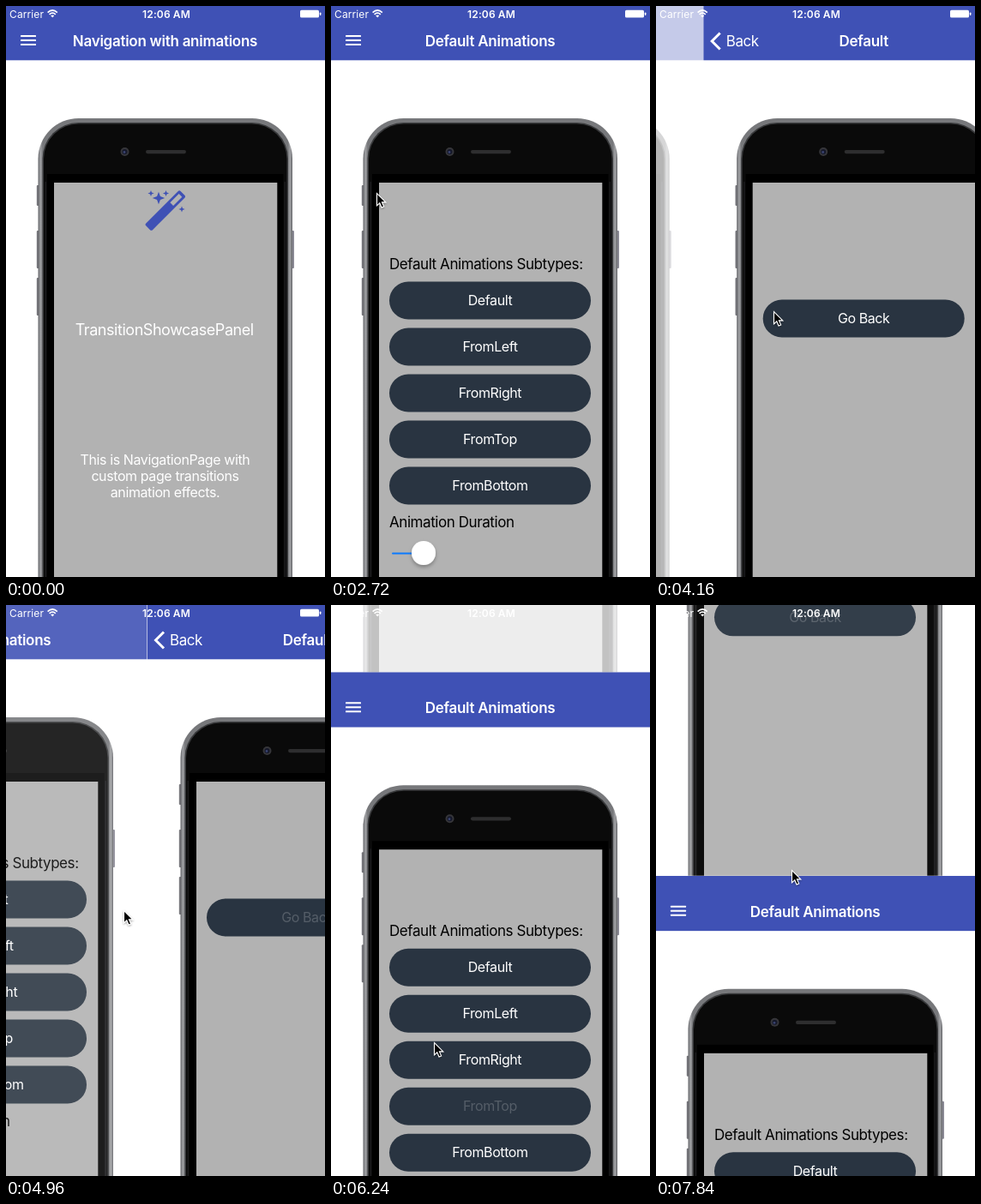
Recreate the animation shown at these times as an HTML page. Size 372x666 px, loop 8000 ms.

```html
<!DOCTYPE html>
<html lang="en">
<head>
<meta charset="utf-8">
<title>Page transitions</title>
<style>
html, body { margin: 0; width: 100%; height: 100%; overflow: hidden; background: #fff; }
svg { display: block; width: 100%; height: 100%; }
text { font-family: Inter, Roboto, sans-serif; letter-spacing: -.025em; fill: #fff; white-space: pre; }
.mid { text-anchor: middle; }
.bold { font-weight: 600; letter-spacing: -.016em; }
.dark { fill: #000; }
.status { letter-spacing: .01em; }
.dim { opacity: .2; }
</style>
</head>
<body>
<svg id="stage" viewBox="0 0 372 666" preserveAspectRatio="none"></svg>
<script>
const W = 375, H = 667, LOOP = 8000, STEP = 160, PUSH = 600, DRAWER = 300;
const INK = '#293441', BLUE = '#3f51b5';

// ---------- markup helpers ----------
const rect = (x, y, w, h, fill, rx = 0) =>
  `<rect x="${x}" y="${y}" width="${w}" height="${h}" rx="${rx}" fill="${fill}"/>`;
const text = (x, y, size, str, cls = '', id = '') =>
  `<text x="${x}" y="${y}" font-size="${size}" class="${cls}" id="${id}">${str}</text>`;
const bars = (x, ys, w, h) => ys.map(y => rect(x, y, w, h, '#fff', .5)).join('');
const button = (y, label, id) =>
  rect(68, y, 235, 44, INK, 22) + text(185.5, y + 27.5, 16, label, 'mid', id);
const star = (x, y, r) =>
  `<path transform="translate(${x} ${y}) scale(${r})" fill="${BLUE}"
    d="M0-1L.27-.27 1 0 .27.27 0 1-.27.27-1 0-.27-.27Z"/>`;

const defs = `<defs>
<clipPath id="screen">${rect(-1.5, -1, W, H, '#000')}</clipPath>
<linearGradient id="rim">
  <stop offset="0" stop-color="#626367"/><stop offset=".009" stop-color="#a1a2a5"/>
  <stop offset=".018" stop-color="#77787b"/><stop offset=".982" stop-color="#77787b"/>
  <stop offset=".991" stop-color="#a1a2a5"/><stop offset="1" stop-color="#626367"/>
</linearGradient>
<filter id="soft" x="-50%" y="-50%" width="200%" height="200%">
  <feDropShadow dx="0" dy="2.5" stdDeviation="2" flood-opacity=".3"/>
</filter>
<filter id="shade" x="-50%" y="-50%" width="200%" height="200%">
  <feDropShadow dx="0" dy="1" stdDeviation="1" flood-opacity=".4"/>
</filter>
<g id="phone">
  ${[[209, 24], [262, 44], [317, 44]].map(([y, h]) => rect(35.8, y, 3, h, '#77777c', 1)).join('')}
  ${rect(333, 262, 3, 44, '#8a8994', 1)}
  ${rect(37.5, 131, 296.5, 640, 'url(#rim)', 47)}
  ${rect(42.5, 136, 286.5, 640, '#38393b', 42)}
  ${rect(44, 137.5, 283.5, 640, '#0a0a0a', 41)}
  ${rect(48, 196, 275.5, 480, '#000')}
  ${rect(45.5, 205, 1.5, 480, '#1b1b1d')}
  ${rect(324.5, 205, 1.5, 480, '#1b1b1d')}
  ${rect(56, 206, 260.3, 480, '#b2b2b2')}
  ${rect(163, 168, 47, 4.2, '#2e2e2f', 2.1)}
  <circle cx="138.5" cy="170" r="5" fill="#36363a"/>
  <circle cx="138.5" cy="170" r="3" fill="#15182a"/>
  <circle cx="138" cy="170.5" r="1.4" fill="#3a4370"/>
</g></defs>`;

const page = (id, title, nav, body) => `<g id="${id}" clip-path="url(#screen)">
  ${rect(-1.5, -1, W, H, '#fff')}<use href="#phone"/>
  ${rect(-1.5, -1, W, 64.3, BLUE)}
  ${text(185.5, 47, 17, title, 'mid bold', id + 'Title')}${nav}${body}</g>`;
const burger = id => `<g id="${id}">${bars(17, [34, 39, 44], 18, 2)}</g>`;

const wand = `<g transform="translate(185.8 238.6) rotate(-45)">
  ${rect(-28.5, -5.4, 57, 10.8, BLUE, 2)}${rect(10.5, -2.6, 14.5, 5.2, '#b2b2b2')}</g>
  ${star(178, 224, 7.2)}${star(169, 218.5, 3.6)}${star(186.5, 218.5, 3.6)}${star(205, 237, 3.6)}`;

const home = page('home', 'Navigation with animations', burger('homeBurger'), wand +
  text(184.7, 384, 18, 'TransitionShowcasePanel', 'mid') +
  ['This is NavigationPage with', 'custom page transitions', 'animation effects.']
    .map((s, i) => text(185.5, 535 + i * 19, 16, s, 'mid')).join(''));

const menu = page('menu', 'Default Animations', burger('menuBurger'),
  text(68, 307, 17, 'Default Animations Subtypes:', 'dark') +
  ['Default', 'FromLeft', 'FromRight', 'FromTop', 'FromBottom']
    .map((s, i) => button(321.5 + i * 54, s, 'btn' + s)).join('') +
  text(68, 607.5, 17, 'Animation Duration', 'dark') +
  rect(71, 637.5, 30, 2, '#0a7aff', 1) +
  '<circle cx="108" cy="638" r="14" fill="#fff" filter="url(#soft)"/>');

const child = page('child', 'Default',
  '<path d="M18 31.5L8.5 41 18 50.5" fill="none" stroke="#fff" stroke-width="3"/>' +
  text(25, 47, 17, 'Back'), button(342.5, 'Go Back', 'goBack'));

// ---------- side drawer ----------
const icons = [
  bars(18, [-7, -1.5, 4], 17, 3),
  bars(18, [-7, -1.5, 4], 17, 3),
  bars(18, [-7, -1.5, 4], 4, 3.4) + bars(24, [-7, -1.5, 4], 14, 3),
  bars(18, [-8, -4, 0, 4], 3, 3) + bars(22.5, [-8, -4, 0, 4], 15.5, 3),
  '<rect x="18.8" y="-7.2" width="18.4" height="14" rx="1.5" fill="none" stroke="#fff" stroke-width="1.6"/>' +
    bars(18.5, [-7.5], 19, 3.5) + bars(21, [-2.5, .2, 3], 2, 1.5) + bars(24.5, [-2.5, .2, 3], 10.5, 1.5)
];
const drawer = `<g id="drawer">${rect(-2, -1, W, H, INK)}
  <circle cx="45" cy="66" r="27" fill="#f1c40f"/>
  ${text(99, 60, 22, 'Navigation', 'bold')}${text(99, 87, 16, 'With animations')}
  ${text(18, 141.5, 17.25, 'ANIMATION TYPES', 'bold')}${rect(-2, 157, W, 1, '#8b929a')}
  ${['Empty', 'Default', 'Fade', 'Slide', 'Flip'].map((s, i) =>
    `<g transform="translate(0 ${180 + i * 44})">${icons[i]}</g>` +
    text(48, 186 + i * 44, 18, s + ' Animations')).join('')}</g>`;

const status = text(4, 13.5, 12, 'Carrier', 'status') +
  text(187, 13.5, 12, '12:06 AM', 'mid bold status') +
  `<g fill="none" stroke="#fff" stroke-width="1.7">
    <path d="M48.6 7.6Q54.2 2.4 59.8 7.6M50.6 9.9Q54.2 6.5 57.8 9.9"/></g>
  <path d="M52.2 11.3Q54.2 9.6 56.2 11.3L54.2 13.4Z" fill="#fff"/>` +
  rect(343, 4.8, 22, 8.8, '#fff', 1.6) + rect(365.8, 7.4, 1.6, 3.6, '#fff', .8);

const arrow = `<path id="cursor" filter="url(#shade)" fill="#000" stroke="#fff" stroke-width="1.1"
  d="M.5.5V14.8L3.8 11.8 6 17 8.6 15.9 6.4 10.9H10.8Z"/>`;

document.getElementById('stage').innerHTML =
  defs + rect(-2, -1, W, H, '#fff') + drawer + home + menu + child + status + arrow;
const $ = id => document.getElementById(id);

// ---------- motion ----------
// Standard ease-in-out curve: (.42, 0) (.58, 1)
function ease(x) {
  if (x <= 0) return 0;
  if (x >= 1) return 1;
  let s = x;
  for (let i = 0; i < 6; i++)
    s -= (1.26 * s - .78 * s * s + .52 * s ** 3 - x) / (1.26 - 1.56 * s + 1.56 * s * s);
  return s * s * (3 - 2 * s);
}
const ramp = (t, start, length) => ease((t - start) / length);

const OPEN = 1322, CLOSE = 2445, SLIDE = 250;
const SIDE = [3722, 4680], TOP = [6096, 7531.3];   // push and pop times

const track = [ // time, x, y
  [160, 124, 229], [1120, 28, 46], [1600, 28, 46], [2240, 53, 218], [2720, 53, 218],
  [3520, 137, 356], [5200, 137, 356], [5760, 120, 508], [5920, 120, 510], [6640, 120, 510],
  [7200, 180, 373], [7360, 188, 357], [7560, 188, 357], [7840, 158, 309]
];
function cursorAt(t) {
  let i = track.findIndex(p => p[0] > t);
  if (i < 0) return track[track.length - 1].slice(1);
  if (!i) return track[0].slice(1);
  const [a, b] = [track[i - 1], track[i]], k = ramp(t, a[0], b[0] - a[0]);
  return [a[1] + (b[1] - a[1]) * k, a[2] + (b[2] - a[2]) * k];
}

const move = (id, x, y) => $(id).setAttribute('transform', `translate(${x} ${y})`);
const show = (id, on) => $(id).style.display = on ? '' : 'none';
const during = (t, start) => t >= start && t < start + PUSH;
const press = (id, on) => $(id).classList.toggle('dim', on);

// A sliding page is see-through until half of it is in view
function place(id, x, y, seen) {
  show(id, seen > 0);
  move(id, x, y);
  $(id).style.opacity = Math.min(1, 2 * seen);
}

function draw(t) {
  const shift = DRAWER * (ramp(t, OPEN, SLIDE) - ramp(t, CLOSE, SLIDE));
  const vertical = t >= TOP[0];
  const [push, pop] = vertical ? TOP : SIDE;
  const q = ramp(t, push, PUSH) - ramp(t, pop, PUSH);
  const atHome = t < CLOSE;

  show('drawer', shift > 0);
  place('home', shift, 0, atHome ? 1 : 0);
  $('homeBurger').style.opacity = t >= OPEN && t < OPEN + SLIDE ? .45 : 1;

  place('menu', vertical ? 0 : shift - W * q, vertical ? H * q : 0, atHome ? 0 : 1 - q);
  place('child', vertical ? 0 : W * (1 - q), vertical ? -H * (1 - q) : 0, q);
  $('childTitle').textContent = vertical ? 'FromTop' : 'Default';

  press('btnDefault', during(t, SIDE[0]));
  press('btnFromTop', during(t, TOP[0]));
  press('goBack', during(t, pop));

  show('cursor', t >= track[0][0]);
  move('cursor', ...cursorAt(t));
}

function tick() {
  const t = (performance.now() + 20) % LOOP;
  draw(Math.floor(t / STEP) * STEP);
  requestAnimationFrame(tick);
}
tick();
</script>
</body>
</html>
```
